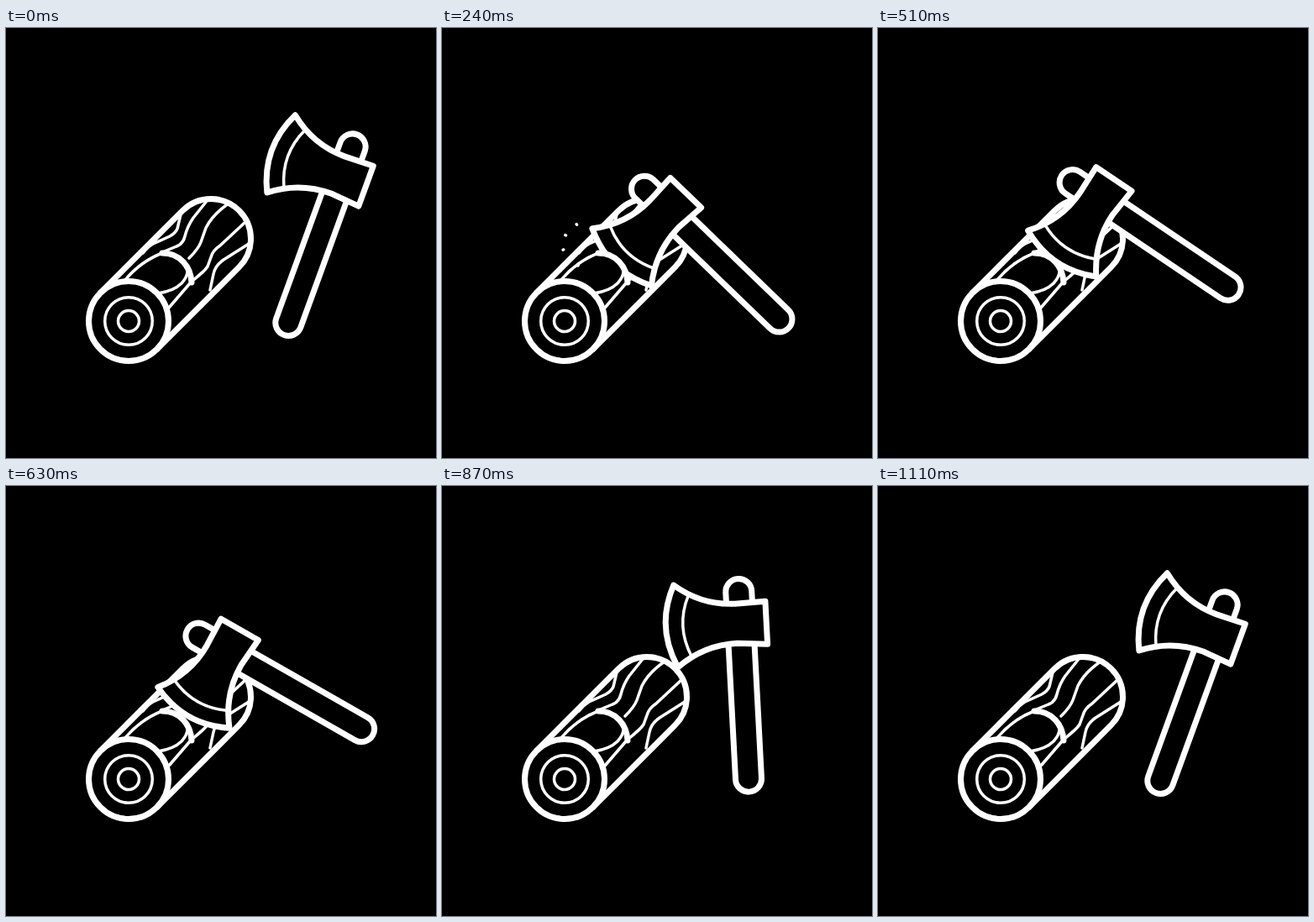
An HTML page that plays this animation: 512x512 px, repeating every 1260 ms.

```html
<!DOCTYPE html>
<html lang="en">
<head>
<meta charset="utf-8">
<title>Axe and log</title>
<style>
  html, body { margin: 0; height: 100%; overflow: hidden; background: #000; }
  svg { display: block; width: 100vw; height: 100vh; }
  g { fill: none; stroke: #fff; stroke-width: 7; stroke-linecap: round; stroke-linejoin: round; }
  .thin { stroke-width: 3.5; }
  .solid { fill: #000; }
</style>
</head>
<body>
<svg viewBox="0 0 512 512">
  <g>
    <g class="thin">
      <path d="M208 222L204 239Q202 244 195 248L175 257Q168 261 163 268"/>
      <path d="M239 206L223 226Q216 236 213 248Q211 257 203 260L186 267"/>
      <path d="M265 209Q246 222 238 238L232 255Q229 263 218 274"/>
      <path d="M285 231L255 259Q246 265 244 273L240 284Q237 289 222 301"/>
      <path d="M289 257L259 276Q249 283 247 293L243 312"/>
    </g>
    <path d="M112.4 315.4L210.4 217.4A47.5 47.5 0 0 1 277.6 284.6L179.6 382.6"/>
  </g>
  <g id="axe" class="solid">
    <path d="M-15.5 -160V0A15.5 15.5 0 0 0 15.5 0V-160"/>
    <path d="M-15.5 -205V-223A15.5 15.5 0 0 1 15.5 -223V-205"/>
    <path d="M-77 -235Q-45 -209 -5 -209L31 -210V-159L-5 -162Q-45 -162 -77 -137Q-101 -186 -77 -235Z"/>
    <path class="thin" d="M-60 -222Q-77 -186 -60 -149"/>
  </g>
  <g>
    <path d="M186 268C207 268 220 284 221 303L190 335L150 300Z" fill="#000" stroke="none"/>
    <path class="thin" d="M186 268Q160 278 141 301M213 279Q221 291 209 304Q200 313 181 316M219 304L194 333"/>
    <path d="M186 268C207 268 220 284 221 303"/>
    <circle class="solid" cx="146" cy="349" r="47.5"/>
    <circle class="thin" cx="146" cy="349" r="28.3"/>
    <circle class="thin" cx="146" cy="349" r="12.5"/>
  </g>
  <g id="chips" class="thin"></g>
</svg>
<script>
  const LOOP = 1260, STEP = 30;
  const smooth = u => u * u * (3 - 2 * u);
  const settle = u => smooth(1 - (1 - u) ** 1.5);

  // time, pivot x, pivot y, angle, easing towards this pose, exponent for the path, sideways sway
  const poses = [
    [0, 362, 280.5, 20],
    [90, 347.5, 294.5, -46, u => u, 1, 0],
    [300, 347.5, 294.5, -46, u => u, 1, 0],
    [630, 358, 252, -60.3, smooth, 1.2, 0],
    [1110, 362, 280.5, 20, settle, 0.8, 4]
  ];
  const axe = document.getElementById("axe");
  const chips = document.getElementById("chips");

  function pose(t) {
    const i = poses.findIndex(p => p[0] > t);
    if (i < 0) return poses[0].slice(1, 4);
    const a = poses[i - 1], b = poses[i];
    const [, , , , ease, power, sway] = b;
    const u = (t - a[0]) / (b[0] - a[0]);
    const p = ease(u), q = p ** power;
    const mix = (k, f) => a[k] + (b[k] - a[k]) * f;
    return [mix(1, q) + sway * Math.sin(2 * Math.PI * u), mix(2, q), mix(3, p)];
  }

  // Short splinters fly off the cut: direction in degrees, reach
  const splinters = [[120, 32], [165, 36], [195, 32], [230, 26]];

  function chipPath(t) {
    const u = (t - 60) / 210;
    if (t < 90 || u >= 1) return "";
    const out = 1 - (1 - u) ** 2;
    return splinters.map(([deg, reach]) => {
      const c = Math.cos(deg * Math.PI / 180), s = Math.sin(deg * Math.PI / 180);
      const from = 8 + reach * out * 0.75, to = from + 5 * (1 - u);
      const at = r => `${178 + c * r} ${255 + s * r}`;
      return `<path d="M${at(from)}L${at(to)}"/>`;
    }).join("");
  }

  function draw(now) {
    const t = Math.floor(now % LOOP / STEP) * STEP;
    const [x, y, angle] = pose(t);
    axe.setAttribute("transform", `translate(${x} ${y}) rotate(${angle}) translate(0 75)`);
    chips.innerHTML = chipPath(t);
  }

  let start;
  function tick(now) {
    start ??= now;
    draw(now - start);
    requestAnimationFrame(tick);
  }
  draw(0);
  requestAnimationFrame(tick);
</script>
</body>
</html>
```
